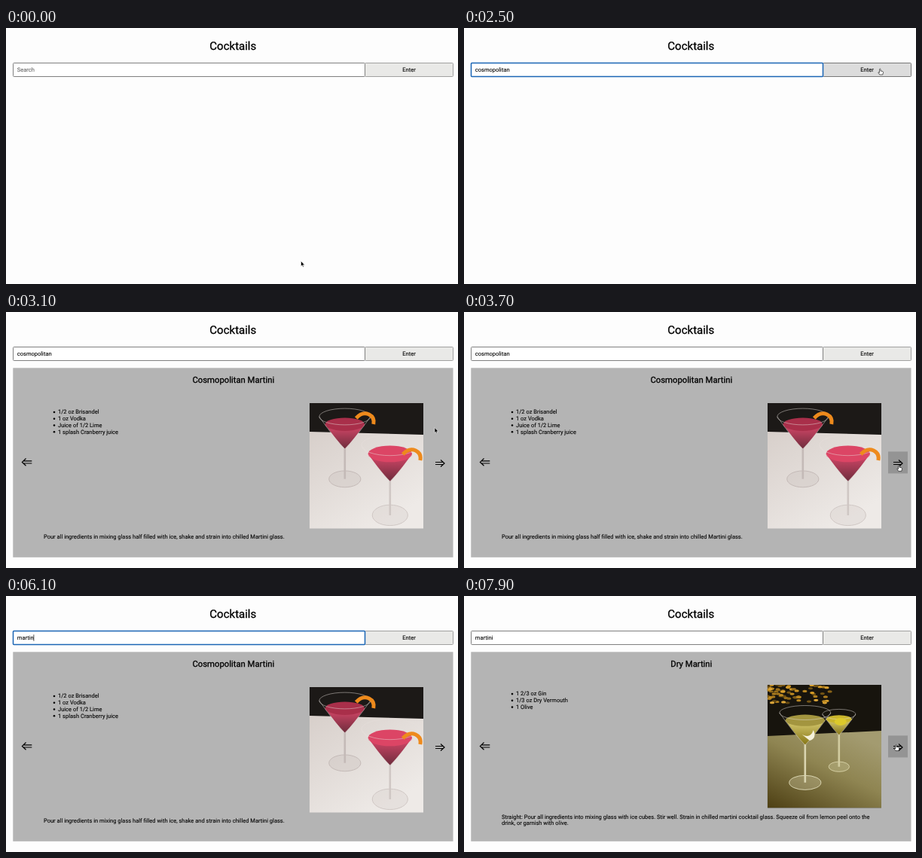
Write an HTML page that moves like this. It is 600 px wide and 340 px high and loops after 8 s.

```html
<!DOCTYPE html>
<html lang="en">
<head>
<meta charset="utf-8">
<title>Cocktails</title>
<style>
  html, body { margin: 0; width: 100%; height: 100%; overflow: hidden; background: #fdfdfd; }
  svg { display: block; }
  text { font: 7.52px Roboto, sans-serif; text-rendering: geometricPrecision; white-space: pre; stroke: currentColor; stroke-width: .1; }
  .head { text-anchor: middle; stroke-width: .3; }
  #name { font-size: 11.3px; }
  #top { font-size: 15px; }
  .arrow { fill: none; stroke: #000; stroke-width: 1.2; }
</style>
</head>
<body>
<svg width="600" height="340" viewBox="0 0 600 340">
  <defs>
    <linearGradient id="marble" x2=".6" y2="1"><stop stop-color="#d3cac5"/><stop offset="1" stop-color="#eeeae7"/></linearGradient>
    <linearGradient id="wood" y1="1" x2=".7" y2="0"><stop stop-color="#4d3f13"/><stop offset=".6" stop-color="#8f8552"/><stop offset="1" stop-color="#a39b70"/></linearGradient>
    <linearGradient id="pink" x2="0" y2="1"><stop stop-color="#d9486a"/><stop offset="1" stop-color="#6d2c3c"/></linearGradient>
    <linearGradient id="gold" x2="0" y2="1"><stop stop-color="#d9cc72"/><stop offset="1" stop-color="#857516"/></linearGradient>
  </defs>
  <text id="top" class="head" x="301.3" y="28.7">Cocktails</text>
  <rect id="button" x="476.5" y="46.5" width="117" height="18" rx="1"/>
  <rect id="field" x="9.5" y="46.5" width="467" height="18" rx="1" fill="#fff"/>
  <text x="535" y="58" text-anchor="middle">Enter</text>
  <text id="query" x="14.8" y="58"></text>
  <path id="caret" stroke="#000" stroke-width=".7"/>
  <g id="panel">
    <rect x="9.3" y="74.3" width="584.2" height="251.5" fill="#b4b4b4"/>
    <rect id="next" x="563" y="185.4" width="26" height="29" fill="#949494"/>
    <path class="arrow" d="M26.5 194.5L21.4 199.4L26.5 204.3M23.4 197.8H34.3M23.4 201H34.3"/>
    <path class="arrow" d="M577 196.5L582 201L577 205.5M570 199.5H580.3M570 202.5H580.3"/>
    <text id="name" class="head" x="301.8" y="94.1"></text>
    <text id="idle" x="40.6" y="88.4">Search for something...</text>
    <g id="cosmo"></g>
    <g id="plain"></g>
    <g id="dry"></g>
  </g>
  <g id="cursor" stroke-width=".6">
    <path id="pointer" d="M0 0V7L1.6 5.6L2.7 8L3.8 7.5L2.8 5.2H5Z" fill="#000" stroke="#fff"/>
    <path id="hand" d="M-.7 .6Q0 -.4 .7 .6V3L3.6 3.6Q4.4 4 4.2 5.2L3.5 8H-.6L-2.5 5Q-2.2 4.2 -.7 5.2Z" fill="#fff" stroke="#000"/>
    <path id="beam" d="M-1.3 -3.5H1.3M0 -3.5V4.5M-1.3 4.5H1.3" stroke="#000"/>
  </g>
</svg>
<script>
const $ = id => document.getElementById(id);
const LINE = 8.75;

function set(id, attrs) {
  for (const key in attrs) $(id).setAttribute(key, attrs[key]);
}
function show(id, on) {
  $(id).style.display = on ? '' : 'none';
}

const ellipse = (x, y, rx, ry, paint = '') =>
  `<ellipse cx="${x}" cy="${y}" rx="${rx}" ry="${ry}" ${paint}/>`;

// A martini glass; every part follows from the rim radius r and the tilt of the view.
function glass(x, y, r, tilt, stem, drink, surface, stemColor) {
  const tip = y + r * 1.26, foot = tip + stem;
  const level = y + r * .3, half = r * .77;
  const line = 'fill="none" stroke="#e6dfdb" stroke-opacity=".6" stroke-width=".8"';
  const cone = (top, w, paint) => `<path d="M${x - w} ${top}Q${x - w * .4} ${tip - w * .4} ${x} ${tip}Q${x + w * .4} ${tip - w * .4} ${x + w} ${top}" ${paint}/>`;
  return ellipse(x, foot, r * .62, r * tilt, `fill="${stemColor}" fill-opacity=".3" stroke="${stemColor}"`) +
    `<path d="M${x} ${tip - 2}V${foot}" stroke="${stemColor}" stroke-width="2.6"/>` +
    cone(level, half, `fill="${drink}"`) +
    ellipse(x, level, half, r * tilt * .8, `fill="${surface}"`) +
    cone(y, r, line) + ellipse(x, y, r, r * tilt, line);
}

const peel = (x, y) =>
  `<path d="M${x - 12} ${y}q8 -9 17 -5q8 4 6 13" fill="none" stroke="#ee8a1c" stroke-width="5"/>`;

// Sunlit leaves in the upper left, thinning out to the right.
function leaves() {
  let seed = 7, out = '';
  const rand = () => (seed = seed * 16807 % 2147483647) / 2147483647;
  for (let i = 0; i < 70; i++) {
    out += ellipse(100 * rand() * rand(), 24 * rand(), 3, 1.6, `fill="hsl(40 70% ${20 + 35 * rand()}%)"`);
  }
  return out;
}

const photo = (y, height, art) =>
  `<svg x="402.8" y="${y}" width="151.2" height="${height}">${art}</svg>`;

function recipe(listY, items, noteY, notes) {
  return items.map((item, i) => {
    const y = listY + i * LINE;
    return ellipse(64, y - 2.3, 1.3, 1.3) + `<text x="69" y="${y}">${item}</text>`;
  }).join('') +
  notes.map((note, i) => `<text x="50" y="${noteY + i * LINE}">${note}</text>`).join('');
}

const gin = ['1 2/3 oz Gin', '1/3 oz Dry Vermouth', '1 Olive'];
const stir = [
  'Straight: Pour all ingredients into mixing glass with ice cubes. Stir well. Strain in chilled martini cocktail glass. Squeeze oil from lemon peel onto the',
  'drink, or garnish with olive.'
];

$('cosmo').innerHTML =
  recipe(135.3, ['1/2 oz Brisandel', '1 oz Vodka', 'Juice of 1/2 Lime', '1 splash Cranberry juice'], 301.3,
    ['Pour all ingredients in mixing glass half filled with ice, shake and strain into chilled Martini glass.']) +
  photo(121, 166.4, `
    <rect width="152" height="167" fill="url(#marble)"/>
    <path d="M0 0H152V42L0 38Z" fill="#1c1917"/>` +
    glass(47, 18, 34, .32, 40, 'url(#pink)', '#a92f4a', '#c4bab7') + peel(74, 20) +
    glass(107, 56, 38, .36, 45, 'url(#pink)', '#dc4565', '#cfc7c4') + peel(136, 68));

$('plain').innerHTML = recipe(169.3, gin, 259.1, stir);

$('dry').innerHTML = recipe(132.4, gin, 295.7, stir) +
  photo(118, 163.2, `
    <rect width="152" height="164" fill="#17140d"/>${leaves()}
    <path d="M0 68L152 61V164H0Z" fill="url(#wood)"/>` +
    glass(95, 39, 22, .3, 42, 'url(#gold)', '#c9b52c', '#d2cca0') +
    glass(50, 37, 34, .28, 50, 'url(#gold)', '#a3953f', '#d9d4b0') +
    `<path d="M46 66q11 6 15 -6q5 11 -5 14z" fill="#f5f1da"/>` +
    ellipse(97, 49, 8, 5, 'fill="#dcc92b"'));

const clamp = k => Math.min(1, Math.max(0, k));
const progress = (t, from, to) => clamp((t - from) / (to - from));

// Type one word, hold Backspace, then type the other.
function typed(t) {
  const [first, second] = ['cosmopolitan', 'martini'];
  if (t < 4500) return first.slice(0, Math.round(first.length * progress(t, 500, 2000) ** 1.3));
  if (t < 5200) return first.slice(0, Math.ceil(first.length * (1 - progress(t, 4500, 5000))));
  return second.slice(0, Math.round(second.length * progress(t, 5200, 6300)));
}

// Glides: from time, to time, and where the mouse comes to rest.
const home = [391.5, 309.5], inField = [140, 55];
const glides = [
  [0, 300, inField],
  [2100, 2500, [552.3, 54]],
  [2700, 3300, [577.3, 203.3]],
  [3700, 4300, inField],
  [6300, 6800, [562.3, 56]],
  [7000, 7600, [573.5, 197.5]]
];
const mouseAt = t => glides.reduce(([x, y], [from, to, [endX, endY]]) => {
  const k = progress(t, from, to);
  return [x + (endX - x) * k, y + (endY - y) * k];
}, home);

function draw(now) {
  const t = Math.floor(now % 8000 / 100) * 100;
  const within = (from, to) => t >= from && t < to;

  const visible = !within(500, 2200) && !within(4600, 6400);
  const [x, y] = mouseAt(t);
  const inBar = visible && y > 46 && y < 65;
  const onButton = inBar && x > 477;
  const onField = inBar && x < 477;
  const onNext = visible && x > 563 && x < 589 && y > 185 && y < 214;
  show('cursor', visible);
  set('cursor', { transform: `translate(${x} ${y})` });
  show('hand', onButton || onNext);
  show('beam', onField);
  show('pointer', !onButton && !onNext && !onField);

  const focus = within(300, 2600) || within(4400, 6800);
  set('field', { stroke: focus ? '#1b65b5' : '#808080', 'stroke-width': focus ? 1.5 : 1 });
  set('button', { fill: onButton ? '#dcdcdc' : '#e9e9e7', stroke: onButton ? '#777' : '#a0a0a0' });

  const word = typed(t), query = $('query');
  query.textContent = word || 'Search';
  query.style.color = query.style.fill = word ? '#000' : '#666';
  show('caret', within(500, 2200) || within(5200, 6400));
  const end = 15 + (word ? query.getComputedTextLength() : 0);
  set('caret', { d: `M${end} 51.3V59.8` });

  show('panel', t >= 2600);
  show('next', onNext);
  show('idle', t < 2800);
  show('cosmo', within(2800, 6900));
  show('plain', within(6900, 7200));
  show('dry', t >= 7200);
  $('name').textContent = t < 2800 ? '' : t < 6900 ? 'Cosmopolitan Martini' : t < 7700 ? 'Martini' : 'Dry Martini';
}

function loop() {
  draw(performance.now());
  requestAnimationFrame(loop);
}
loop();
</script>
</body>
</html>
```
